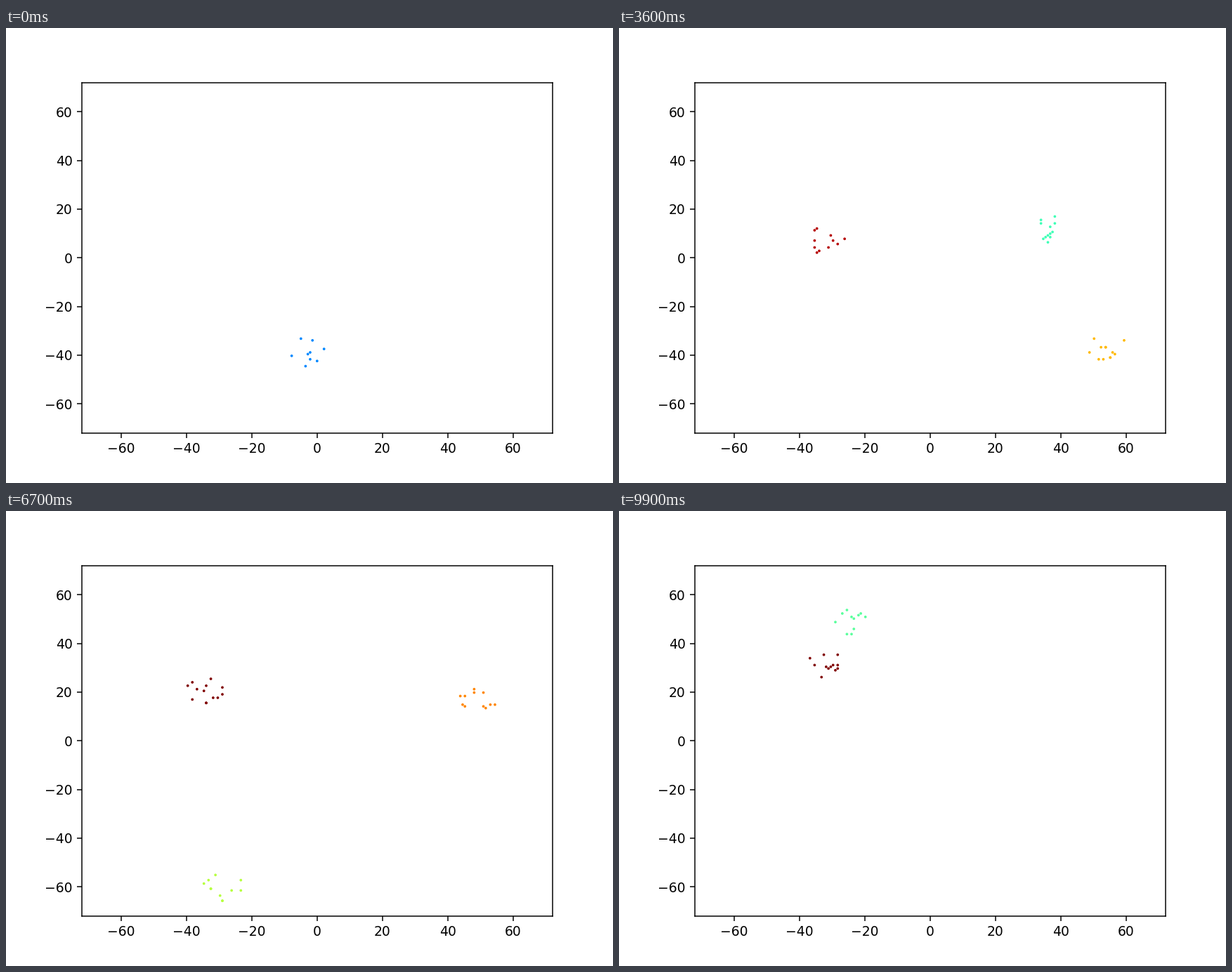
A matplotlib script that plays this animation: 864x648 px, repeating every 10000 ms.

```python
import numpy as np
import matplotlib.pyplot as plt
from matplotlib.animation import FuncAnimation

FRAMES, INTERVAL = 100, 100
GRID = 1 / np.sqrt(2)   # points sit on an integer lattice turned by 45 degrees
RADIUS = 6.2

# Each track: colour level at the start, its change per frame, mean point count,
# and the way points (frame, x, y) of its centre.
TRACKS = [
    (.26, -.0062, 8, [(0, -3.3, -38.5), (9, 23, -44), (17, 24, -53), (22, 25, -57)]),
    (.79, .01, 12, [(20, -17, 2), (30, -30, 2), (44, -34, 13), (60, -34, 31),
                    (67, -34, 20), (82, -32, 26), (99, -32, 32)]),
    (.94, .001, 13, [(24, -51, -20), (30, -50, -23), (34, -52, -24)]),
    (.305, .011, 12, [(25, 33, 11), (30, 35, 9), (44, 39, 16), (75, 53, 15)]),
    (.56, .014, 11, [(25, 51, -29), (30, 53, -31), (37, 54, -37)]),
    (.895, 0, 12, [(37, -23, 2), (44, -20, 1)]),
    (.52, .009, 10, [(61, -29, -57), (75, -29, -63)]),
    (.38, .01, 11, [(91, -26, 46), (99, -25, 49)]),
]


def snapped_disc(cx, cy, count, rng):
    """Random points in a disc, snapped to the turned lattice."""
    r = RADIUS * np.sqrt(rng.random(count))
    a = 2 * np.pi * rng.random(count)
    x, y = cx + r * np.cos(a), cy + r * np.sin(a)
    i, j = np.round((x + y) * GRID), np.round((y - x) * GRID)
    return np.column_stack([i - j, i + j]) * GRID


def cluster(index, frame):
    """Points and colour of one track, or None while it is unseen."""
    level, drift, count, path = TRACKS[index]
    t, xs, ys = np.array(path, float).T
    if not t[0] <= frame <= t[-1]:
        return None
    rng = np.random.default_rng([index, frame])
    count += rng.integers(-1, 2)
    points = snapped_disc(np.interp(frame, t, xs), np.interp(frame, t, ys), count, rng)
    shade = min(1.0, level + drift * (frame - t[0]))
    return points, plt.cm.jet(float(shade))


fig, ax = plt.subplots(figsize=(6.4, 4.8), dpi=135)
ax.set_xlim(-72, 72)
ax.set_ylim(-72, 72)
dots = ax.scatter([], [], s=4, linewidths=0)
sensor = ax.scatter([0], [0], s=.28, marker="s", color="#d0d0d0", linewidths=0)


def update(frame):
    seen = [c for c in (cluster(k, frame) for k in range(len(TRACKS))) if c]
    dots.set_offsets(np.vstack([p for p, _ in seen] or [np.empty((0, 2))]))
    dots.set_facecolors([c for p, c in seen for _ in p])
    sensor.set_offsets([(frame % 2, frame % 2)])
    return dots, sensor


anim = FuncAnimation(fig, update, frames=FRAMES, interval=INTERVAL,
                     repeat=True, repeat_delay=0)
plt.show()
```
